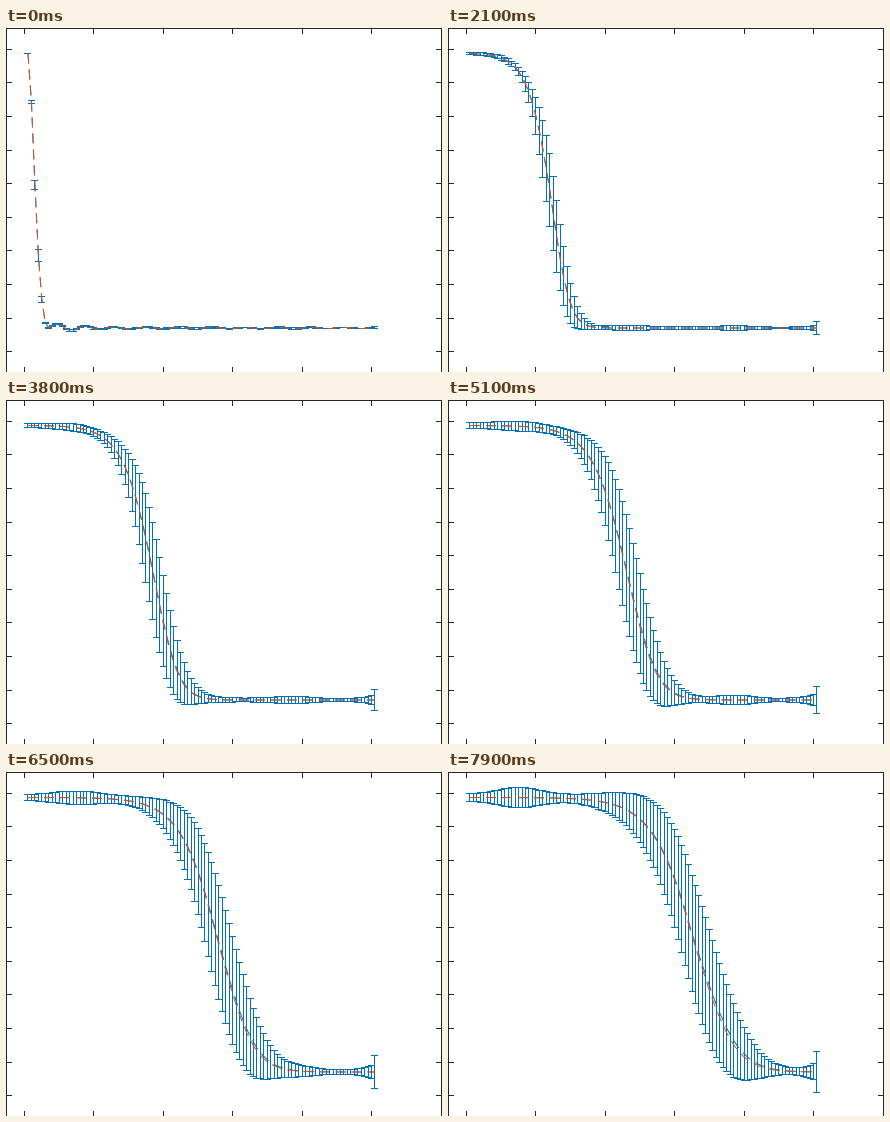
A matplotlib script that plays this animation: 436x344 px, repeating every 8000 ms.

```python
import numpy as np
import matplotlib.pyplot as plt
from matplotlib.animation import FuncAnimation

W, H, DPI = 436, 344, 100
FRAMES, STEP = 80, 100
PX = 72 / DPI                      # one pixel in points
BLUE, RED, INK = "#0072BD", "#D95319", "#262626"
TOP, BASE = 25.5, 300.0            # heights of u = 1 and u = 0
A = np.sqrt(2) - 1                 # wave(0) is about one half
X0, DX = 18.5, 3.47

x = X0 + DX * np.arange(1, 102)


def wave(z):
    """Travelling Fisher front."""
    return (1 + A * np.exp(z)) ** -2


def bump(z):
    """Steepness of the front, scaled to a peak of 1."""
    v = A * np.exp(z)
    return 6.75 * v / (1 + v) ** 3


def gauss(center, width):
    return np.exp(-((x - center) / width) ** 2)


def front(t):
    """Position and slope: a quick start, then steady speed and widening."""
    center = 54 + 24.1 * t - 24.8 * np.exp(-t / 0.95)
    slope = 3.69 / (33 * (t + 0.1) ** 0.45)
    return center, slope


def ringing(t):
    turns = np.interp(x, [25, 52, 107, 371], [-1, 0, 2, 10])
    size = 0.6 + 3.4 * np.exp(-(x - 52) / 30)
    gate = 1 / (1 + np.exp(36 - x))
    return size * gate * np.cos(2 * np.pi * turns) * np.exp(-t / 0.25)


def height(t, z):
    u = wave(z)
    u = u / u[0]
    start = np.exp(-(np.arange(x.size) / 2.55) ** 1.75)
    u = u + (start - u) * np.exp(-t / 0.15)
    return BASE - (BASE - TOP) * u - ringing(t)


def spread(t):
    """Slowly growing, wavy background error, widest at the right edge."""
    wavy = 1 + 0.3 * np.cos(2 * np.pi * (x - 293) / 110)
    s = (0.5 + 0.6 * t) * wavy * (1 - 0.45 * gauss(325, 22))
    s += 3.5 * (t / 8) ** 6 * gauss(70, 25)
    s += 0.45 * t * np.exp((x - 365.5) / 8)
    s[-1] *= 2
    return s


def curves(t):
    center, slope = front(t)
    z = slope * (x - center)
    k = 1.14 - 0.036 * t
    right = np.where(z > 0, k * z, z)
    mean = height(t, right)
    single = height(t, right * np.where(z > 0, 1 + 0.006 * t, 1) + 0.004 * t)

    ze = z - 1.5 * slope * np.exp(-t / 0.3)
    ze = np.where(ze > 0, 0.84 * k * ze + 0.015 * ze ** 2,
                  (1.53 - 0.095 * t) * ze)
    peak = 6 + 55.5 * (1 - np.exp(-t / 2.6))
    return mean, single, np.hypot(peak * bump(ze), spread(t))


def crisp(v):
    return np.floor(v) + 0.5


def error_bars(mean, err):
    """One broken line holding every stem and both caps."""
    c, lo, hi = crisp(x), crisp(mean - err), crisp(mean + err)
    l, r, gap = c - 3.5, c + 3.5, np.full_like(c, np.nan)
    xs = np.column_stack([c, c, gap, l, r, gap, l, r, gap])
    ys = np.column_stack([lo, hi, gap, lo, lo, gap, hi, hi, gap])
    return xs.ravel(), ys.ravel()


fig = plt.figure(figsize=(W / DPI, H / DPI), dpi=DPI, facecolor="white")
ax = fig.add_axes([0, 0, 1, 1])
ax.set(xlim=(0, W), ylim=(H, 0))
ax.axis("off")


def line(xs, ys, color, **kw):
    kw = {"lw": PX, "solid_capstyle": "butt", "snap": False, **kw}
    return ax.plot(xs, ys, color=color, **kw)[0]


# Frame and ticks
line([0.5, 0.5], [0, H], INK)
line([W - 0.5, W - 0.5], [0, H], INK)
line([0, W], [0.5, 0.5], INK)
for tx in crisp(X0 + 20 * DX * np.arange(6)):
    line([tx, tx], [0, 6], INK)
    line([tx, tx], [H - 5, H], INK)
for ty in crisp(21.3 + 33.6 * np.arange(10)):
    line([0, 6], [ty, ty], INK)
    line([W - 6, W], [ty, ty], INK)

dash = {"dashes": (10, 6), "dash_capstyle": "butt"}
bars = line([], [], BLUE)
mean_line = line([], [], BLUE, **dash)
single_line = line([], [], RED, **dash)


def draw(i):
    mean, single, err = curves(i * STEP / 1000)
    bars.set_data(*error_bars(mean, err))
    mean_line.set_data(x, mean)
    single_line.set_data(x, single)
    return bars, mean_line, single_line


anim = FuncAnimation(fig, draw, frames=FRAMES, interval=STEP,
                     repeat=True, repeat_delay=0)
plt.show()
```
